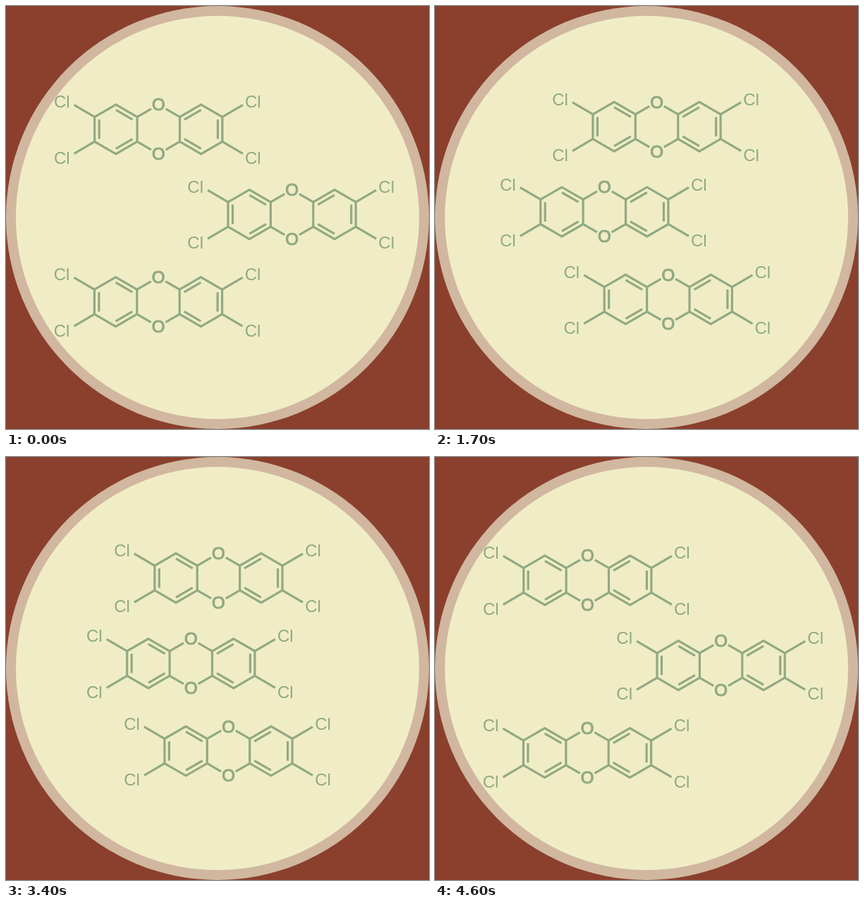
An HTML page with a canvas that plays this animation: 600x600 px, repeating every 5000 ms.

```html
<!DOCTYPE html>
<html lang="en">
<head>
<meta charset="utf-8">
<title>Drifting molecules</title>
<style>
  html, body { margin: 0; width: 100%; height: 100%; overflow: hidden; background: #8a402d; }
  canvas { display: block; width: 600px; height: 600px; }
</style>
</head>
<body>
<canvas id="stage" width="600" height="600"></canvas>
<script>
const ctx = document.getElementById('stage').getContext('2d');
const LOOP = 5000, STEP = 100;
const GREEN = '#91a983';

// Resting centres on both sides; crest is the height of the swell on the way back
const molecules = [
  { from: 216.3, to: 332, y: 174.8, crest: 3.4 },
  { from: 405.6, to: 210.9, y: 295.6, crest: 5.6 },
  { from: 216, to: 351.2, y: 419.7, crest: 6.4 }
];

// Progress of a crossing, in steps
const travel = [[0, 0], [2.5, .028], [5, .127], [7, .264], [11, .647],
                [13, .849], [15, .95], [17, .99], [18.5, 1]];
const bobOut = () => [[0, 0], [2.3, -4.9], [7, 3.8], [12, -5], [16, 3.8], [18, 0]];
const bobBack = crest => [[0, 0], [6.7, -4.3], [12, crest], [16, -4.3], [18.3, 0]];

function segment(keys, t) {
  let i = 0;
  while (i < keys.length - 2 && t > keys[i + 1][0]) i++;
  const span = keys[i + 1][0] - keys[i][0];
  const u = Math.min(1, Math.max(0, (t - keys[i][0]) / span));
  return { i, u, span };
}

function slope(keys, i) {
  if (i === 0 || i === keys.length - 1) return 0;
  const [a, b, c] = [keys[i - 1], keys[i], keys[i + 1]];
  const h1 = b[0] - a[0], h2 = c[0] - b[0];
  return ((b[1] - a[1]) / h1 * h2 + (c[1] - b[1]) / h2 * h1) / (h1 + h2);
}

// Smooth curve through the keys
function spline(keys, t) {
  const { i, u, span } = segment(keys, t);
  const s = u * u * (3 - 2 * u);
  return keys[i][1] * (1 - s) + keys[i + 1][1] * s +
    span * u * (1 - u) * (slope(keys, i) * (1 - u) - slope(keys, i + 1) * u);
}

// Eased stops at every key
function swing(keys, t) {
  const { i, u } = segment(keys, t);
  return keys[i][1] + (keys[i + 1][1] - keys[i][1]) * u * u * (3 - 2 * u);
}

function line(x1, y1, x2, y2) {
  ctx.moveTo(x1, y1);
  ctx.lineTo(x2, y2);
}

// Half of the molecule; side is -1 for left, 1 for right
function wing(side) {
  const mid = 60.4 * side;
  const ring = [[-30.2, -17.5], [0, -35], [30.2, -17.5], [30.2, 17.5], [0, 35], [-30.2, 17.5]];
  const at = ([x, y], k = 1) => [mid + x * side * k, y * k];

  ctx.beginPath();
  ring.forEach((p, i) => ctx[i ? 'lineTo' : 'moveTo'](...at(p)));
  ctx.closePath();
  for (const i of [0, 2, 4]) line(...at(ring[i], .785), ...at(ring[i + 1], .785));
  for (const v of [-1, 1]) {
    line(30.2 * side, 17.5 * v, 10.3 * side, 29 * v);
    line(90.6 * side, 17.5 * v, 119.6 * side, 34.5 * v);
  }
  ctx.stroke();
}

function molecule(x, y) {
  ctx.save();
  ctx.translate(x, y);
  ctx.strokeStyle = ctx.fillStyle = GREEN;
  ctx.lineWidth = 3.2;
  ctx.lineJoin = 'miter';
  wing(-1);
  wing(1);

  ctx.font = '24px "Liberation Sans", Arial, sans-serif';
  ctx.textBaseline = 'alphabetic';
  ctx.textAlign = 'left';
  for (const tx of [-148.3, 122.7]) {
    ctx.fillText('Cl', tx, -30.4);
    ctx.fillText('Cl', tx, 48.8);
  }
  ctx.textAlign = 'center';
  ctx.lineWidth = 1.2;
  for (const ty of [-26.5, 43.4]) {
    ctx.fillText('O', 0, ty);
    ctx.strokeText('O', 0, ty);
  }
  ctx.restore();
}

function disc(r, color) {
  ctx.fillStyle = color;
  ctx.beginPath();
  ctx.arc(300, 300, r, 0, Math.PI * 2);
  ctx.fill();
}

function draw(now) {
  const n = Math.floor((now % LOOP) / STEP);
  const back = n >= 27;
  const k = Math.max(0, n - (back ? 26 : 4));
  const p = back ? 1 - spline(travel, k - 1) : spline(travel, k);

  ctx.fillStyle = '#8a402d';
  ctx.fillRect(0, 0, 600, 600);
  disc(300, '#d1b79f');
  disc(286, '#f0edc6');
  for (const m of molecules) {
    const bob = swing(back ? bobBack(m.crest) : bobOut(), k);
    molecule(m.from + (m.to - m.from) * p, m.y + bob);
  }
}

const start = performance.now();
function tick() {
  draw(performance.now() - start);
  requestAnimationFrame(tick);
}
tick();
</script>
</body>
</html>
```
